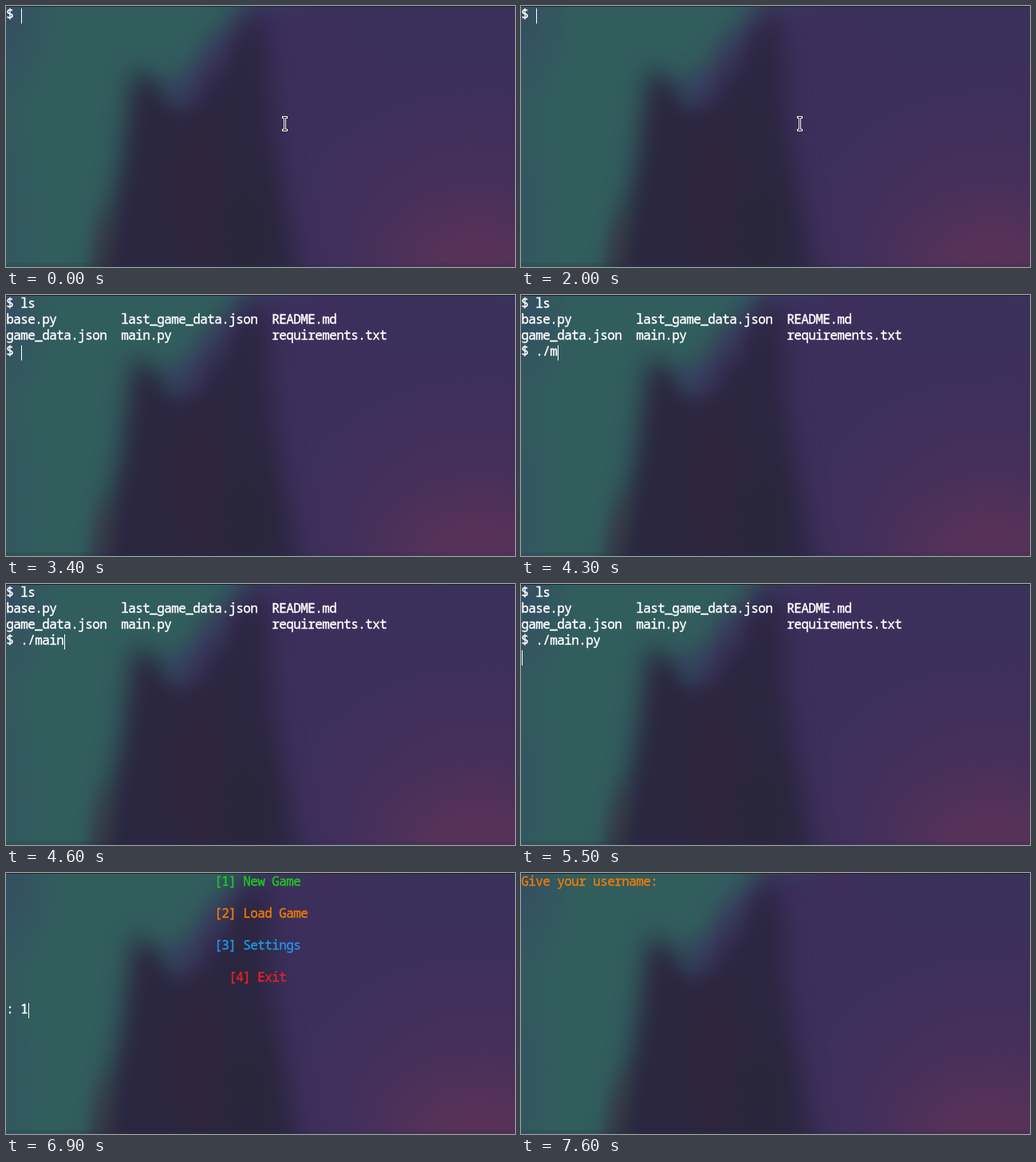
An HTML page with a canvas for the animation above (8 s loop, 638 by 327 pixels).

```html
<!DOCTYPE html>
<html lang="en">
<head>
<meta charset="utf-8">
<title>Terminal session</title>
<style>
  html, body { margin: 0; width: 100%; height: 100%; overflow: hidden; background: #2b2740; }
  canvas { display: block; }
</style>
</head>
<body>
<canvas id="stage" width="638" height="327"></canvas>
<script>
const W = 638, H = 327, LOOP = 8000;
const CELL = 9, LINE = 20, LEFT = 1;
const WHITE = '#ffffff', ORANGE = '#f07a08';
const ctx = document.getElementById('stage').getContext('2d');

function glow(g, x, y, rx, ry, rgb, alpha) {
  g.save();
  g.translate(x, y);
  g.scale(rx, ry);
  const fill = g.createRadialGradient(0, 0, 0, 0, 0, 1);
  for (let i = 0; i <= 8; i++) {
    const falloff = (1 + Math.cos(Math.PI * i / 8)) / 2;
    fill.addColorStop(i / 8, `rgba(${rgb},${alpha * falloff})`);
  }
  g.fillStyle = fill;
  g.fillRect(-1, -1, 2, 2);
  g.restore();
}

function softShape(g, blur, color, points) {
  g.save();
  g.filter = `blur(${blur}px)`;
  g.fillStyle = color;
  g.beginPath();
  points.forEach(([x, y]) => g.lineTo(x, y));
  g.fill();
  g.restore();
}

function paintWallpaper() {
  const layer = document.createElement('canvas');
  layer.width = W;
  layer.height = H;
  const g = layer.getContext('2d');

  // Purple side
  g.fillStyle = '#3c2f5c';
  g.fillRect(0, 0, W, H);
  glow(g, 640, 0, 260, 130, '56,51,88', 0.7);
  glow(g, 600, 290, 330, 250, '78,48,88', 0.6);
  glow(g, 590, 325, 190, 130, '92,50,88', 0.85);

  // Teal side
  softShape(g, 17, '#315d5d', [[-80, -80], [375, -80], [295, 8], [248, 62], [212, 118], [180, 400], [-80, 400]]);
  glow(g, 0, 20, 75, 130, '54,72,100', 0.6);
  glow(g, 0, 260, 50, 260, '52,80,98', 0.45);
  glow(g, 340, 0, 55, 24, '56,58,98', 0.6);

  // Dark middle with its blue notch
  softShape(g, 15, '#2b2640', [
    [160, 78], [188, 92], [224, 134], [262, 86], [312, 2], [328, 45], [334, 150],
    [350, 240], [378, 400], [94, 400], [117, 315], [143, 205]
  ]);
  glow(g, 222, 104, 45, 42, '53,62,98', 0.45);
  glow(g, 262, 62, 34, 44, '54,62,94', 0.3);
  glow(g, 242, 240, 55, 150, '52,36,54', 0.6);
  glow(g, 300, 285, 60, 120, '40,38,56', 0.7);
  glow(g, 122, 305, 28, 85, '62,52,62', 0.4);

  // Window edges
  g.fillStyle = 'rgba(40,50,75,0.18)';
  g.fillRect(0, 322, W, 5);
  g.fillStyle = '#222326';
  g.fillRect(0, 0, W, 1);
  return layer;
}

const run = (row, col, text, color = WHITE) => ({ row, col, text, color });

// The cursor follows the last run of a screen.
const listing = [
  run(0, 0, '$ ls'),
  run(1, 0, 'base.py'), run(1, 16, 'last_game_data.json'), run(1, 37, 'README.md'),
  run(2, 0, 'game_data.json'), run(2, 16, 'main.py'), run(2, 37, 'requirements.txt')
];
const shell = input => [...listing, run(3, 0, '$ ' + input)];
const menu = input => [
  run(0, 29, '[1] New Game', '#20c820'),
  run(2, 29, '[2] Load Game', ORANGE),
  run(4, 29, '[3] Settings', '#2196e6'),
  run(6, 31, '[4] Exit', '#e52222'),
  run(8, 0, ': ' + input)
];

// Start time, screen, and the start of the blink when it differs
const steps = [
  [0, [run(0, 0, '$ ')]],
  [3200, [run(0, 0, '$ ls')]],
  [3400, shell('')],
  [3700, shell('.')],
  [3800, shell('./')],
  [4300, shell('./m')],
  [4400, shell('./ma')],
  [4500, shell('./mai')],
  [4600, shell('./main')],
  [4900, shell('./main.')],
  [5100, shell('./main.py')],
  [5500, [...shell('./main.py'), run(4, 0, '')]],
  [5600, menu(''), 5500],
  [6900, menu('1')],
  [7200, [run(0, 0, 'Give your username: ', ORANGE)], 7100]
];

function drawText({ row, col, text, color }) {
  const x = LEFT + col * CELL - 0.7, y = 16 + row * LINE;
  ctx.fillStyle = ctx.strokeStyle = color;
  ctx.fillText(text, x, y);
  ctx.strokeText(text, x, y);
}

function drawPointer() {
  ctx.lineCap = 'square';
  for (const [width, color] of [[3, WHITE], [1, '#111111']]) {
    ctx.lineWidth = width;
    ctx.strokeStyle = color;
    ctx.beginPath();
    for (const y of [139.5, 155.5]) {
      ctx.moveTo(347.5, y);
      ctx.lineTo(351.5, y);
    }
    ctx.moveTo(349.5, 139.5);
    ctx.lineTo(349.5, 155.5);
    ctx.stroke();
  }
}

const wallpaper = paintWallpaper();

function draw(t) {
  const [start, runs, blinkStart = start] = steps.findLast(step => step[0] <= t);
  ctx.drawImage(wallpaper, 0, 0);

  // 16px glyphs are 9.6px wide; tighten them to the cell and thicken slightly.
  ctx.font = '16px "Noto Sans Mono", monospace';
  ctx.letterSpacing = '-0.6px';
  ctx.lineWidth = 0.4;
  ctx.lineJoin = 'round';
  runs.forEach(drawText);

  if (Math.floor((t - blinkStart) / 500) % 2 === 0) {
    const { row, col, text } = runs[runs.length - 1];
    ctx.fillStyle = WHITE;
    ctx.fillRect(LEFT + (col + text.length) * CELL, 3 + row * LINE, 1, 19);
  }
  if (t < 3200) drawPointer();
}

let origin;
function tick(now) {
  origin ??= now;
  draw((now - origin) % LOOP);
  requestAnimationFrame(tick);
}
draw(0);
requestAnimationFrame(tick);
</script>
</body>
</html>
```
